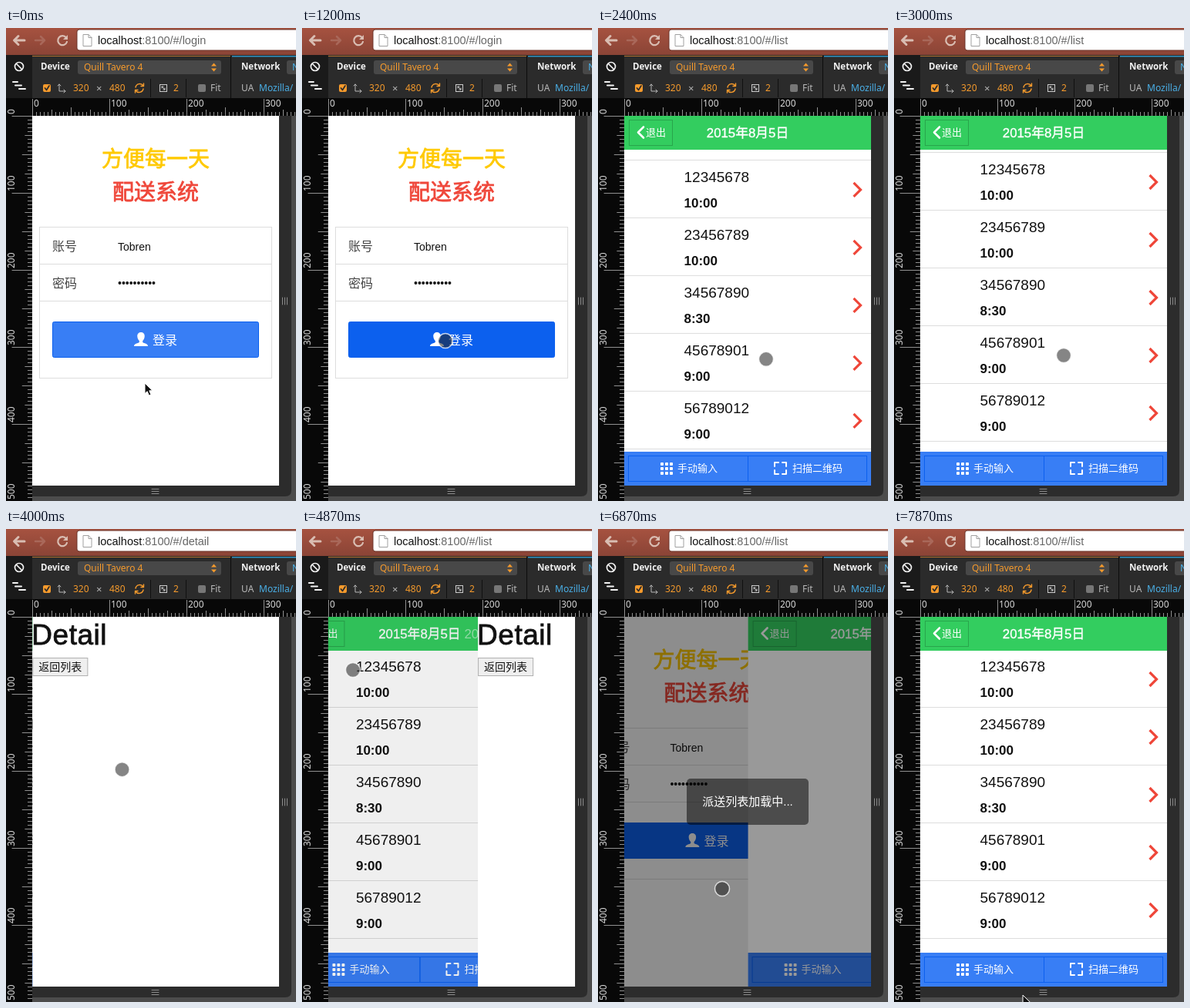
Write an HTML page that moves like this. It is 376 px wide and 614 px high and loops after 7940 ms.

```html
<!DOCTYPE html>
<html lang="zh-CN">
<head>
<meta charset="utf-8">
<title>Delivery app preview</title>
<style>
  html, body { margin: 0; width: 100%; height: 100%; overflow: hidden; background: #4c4c4c; }
  svg { display: block; width: 376px; height: 614px; }
  text { font-family: "Liberation Sans", "Noto Sans CJK SC", "Noto Sans CJK", sans-serif; white-space: pre; }
  .ui { font-family: "Noto Sans", "Open Sans", sans-serif; }
  .b { font-weight: 700; }
  .m { font-weight: 500; }
  .line { fill: none; stroke-linecap: round; stroke-linejoin: round; }
</style>
</head>
<body>
<svg id="stage" viewBox="0 0 376 614" xmlns="http://www.w3.org/2000/svg"></svg>
<script>
const LOOP = 7940, STEP = LOOP / 119;
const WHITE = '#fff', BLUE = '#387ef5', DEEP = '#0c60ee', GREEN = '#33cd5f', GOLD = '#ffc900', RED = '#ef473a';
const EDGE = '#ddd', INK = '#111', ORANGE = '#f59a2c', SKY = '#4ab0e8', PALE = '#f2f2f2', GREY = '#b8b8b8';

// Markup helpers; text is placed by its left edge (or anchor) and visual middle.
const rect = (x, y, w, h, fill, more = '') =>
  `<rect x="${x}" y="${y}" width="${w}" height="${h}" fill="${fill}" ${more}/>`;
const frame = (x, y, w, h, stroke, more = '') =>
  rect(x + .5, y + .5, w - 1, h - 1, 'none', `stroke="${stroke}" ${more}`);
const text = (x, y, size, fill, str, more = '') =>
  `<text x="${x}" y="${y + size * .36}" font-size="${size}" fill="${fill}" ${more}>${str}</text>`;
const line = (d, stroke, w = 1, more = '') =>
  `<path class="line" d="${d}" stroke="${stroke}" stroke-width="${w}" ${more}/>`;
const heavy = (color, w) => `stroke="${color}" stroke-width="${w}"`;
const mid = 'text-anchor="middle"';

function browserBar() {
  return rect(0, 0, 376, 35, 'url(#wood)') +
    line('M24 16H11M16 10.500L10.500 16L16 21.500', '#d9bdb2', 3) +
    line('M38 16H50M45 11L50 16L45 21', '#a9685a', 2.500) +
    line('M78 12.500A6 6 0 1 0 79 18', '#d9bdb2', 2.200) +
    '<path d="M80 9V15H74Z" fill="#d9bdb2"/>' +
    rect(92, 2, 290, 27, WHITE, 'rx="3" stroke="#6b3328"') +
    '<path d="M100 8.500H107L111 12.500V23.500H100Z" fill="#fff" stroke="#a0a0a0"/>' +
    line('M107 8.500V12.500H111', '#a0a0a0') +
    `<text x="119" y="21" font-size="14.500" fill="#666"><tspan fill="${INK}">localhost</tspan><tspan id="path"></tspan></text>`;
}

function toolPanel() {
  const ui = 'class="ui"', bold = 'class="ui b"';
  return rect(0, 35, 376, 79, '#2b2b2b') + rect(0, 35, 34, 79, '#1a1a1a') +
    rect(34, 36, 257, 1, '#b3722e') + rect(293, 36, 83, 1.500, '#2f93c4') +
    rect(291, 36, 1, 55, '#0c0c0c') +
    `<circle cx="17" cy="50" r="5.500" fill="none" ${heavy(PALE, 1.7)}/>` +
    line('M13.500 46.500L20.500 53.500', PALE, 1.700) +
    line('M9 70H15M12 74.500H20M17 79H25', PALE, 2) +
    text(45, 50, 11.500, PALE, 'Device', bold) +
    rect(93, 42, 186, 18, '#484848', 'rx="3"') +
    text(101, 50.500, 12, ORANGE, 'Quill Tavero 4', 'class="ui m"') +
    `<path d="M266 49.500L269.500 45.500L273 49.500ZM266 52.500L269.500 56.500L273 52.500Z" fill="${ORANGE}"/>` +
    text(305, 50, 11.500, PALE, 'Network', bold) +
    rect(364, 42, 20, 18, '#484848', 'rx="3"') + text(371, 50.500, 12, SKY, 'N', ui) +
    rect(48, 73, 10, 10, ORANGE, 'rx="2"') + line('M50.500 78L52.500 80.500L56 75', '#2b2b2b', 1.700) +
    line('M69 73V82H77M67 75L69 73L71 75M75 80L77 82L75 84', GREY) +
    text(87, 78, 12, ORANGE, '320', ui) + text(117, 78, 13, GREY, '×', ui) +
    text(134, 78, 12, ORANGE, '480', ui) +
    line('M168 77A5.500 5.500 0 0 1 178 75M178 79A5.500 5.500 0 0 1 168 81M178.500 72V75.500H175M167.500 84V80.500H171', ORANGE, 1.400) +
    rect(187, 66, 1, 24, '#111') + rect(233, 66, 1, 24, '#111') +
    frame(199, 73, 10, 10, '#ccc') + line('M202 76L206 80M202 78V76H204M206 78V80H204', '#ccc') +
    text(217, 78, 12, ORANGE, '2', ui) +
    rect(249, 73, 10, 10, '#777', 'rx="2"') + text(265, 78, 12, GREY, 'Fit', ui) +
    text(305, 78, 12, GREY, 'UA', ui) + text(328, 78, 12, SKY, 'Mozilla/', ui);
}

function rulers() {
  let ticks = '', labels = '';
  for (let p = 0; p <= 500; p += 5) {
    const len = p % 100 ? (p % 50 ? (p % 25 ? 5 : 8) : 11) : 22;
    if (p < 342) ticks += `M${34.5 + p} 114V${114 - len}`;
    ticks += `M34 ${114.5 + p}H${34 - len * 1.2}`;
    if (p % 100) continue;
    if (p <= 300) labels += text(36 + p, 98, 12, '#d8d8d8', p, 'class="ui"');
    labels += `<g transform="translate(7 ${112 + p}) rotate(-90)">${text(0, 0, 12, '#d8d8d8', p, 'class="ui"')}</g>`;
  }
  return rect(34, 91, 342, 23, '#080808') + rect(0, 91, 34, 523, '#080808') +
    `<path d="${ticks}" stroke="#909090" fill="none"/>` + labels;
}

function resizers() {
  return rect(34, 114, 342, 500, '#4c4c4c') +
    '<path d="M34 114H370V600Q370 608 362 608H34Z" fill="#2c2c2c"/>' +
    line('M358.500 350V359M361.500 350V359M364.500 350V359M189 598.500H198M189 601.500H198M189 604.500H198', '#8c8c8c');
}

function loginPage() {
  const person = 'M175 395C171.500 395 170 397.500 170.300 400.500C170.500 403 171.500 405 172.800 406V408C171 409.500 166 409.500 166 413H184C184 409.500 179 409.500 177.200 408V406C178.500 405 179.500 403 179.700 400.500C180 397.500 178.500 395 175 395Z';
  return rect(34, 114, 320, 480, WHITE) +
    text(194, 170, 28, GOLD, '方便每一天', `${heavy(GOLD, .8)} ${mid}`) +
    text(194, 213, 28, RED, '配送系统', `${heavy(RED, .8)} ${mid}`) +
    frame(43, 258, 302, 197, EDGE) + rect(43, 306, 302, 1, EDGE) + rect(43, 354, 302, 1, EDGE) +
    `<g id="bar">${rect(43, 259, 3, 95, '#42a948')}</g>` +
    `<g id="labels">${text(60, 283, 16, '#444', '账号')}${text(60, 331, 16, '#444', '密码')}</g>` +
    `<g id="inputs">${text(145, 284, 14, INK, 'Tobren')}${text(145, 331, 14, INK, '•'.repeat(10))}</g>` +
    rect(60.5, 381.5, 267, 46, BLUE, `id="login" rx="2" stroke="${DEEP}"`) +
    `<path d="${person}" fill="${WHITE}"/>` + text(190, 405, 16, WHITE, '登录');
}

function listPage() {
  const rows = [['12345678', '10:00'], ['23456789', '10:00'], ['34567890', '8:30'], ['45678901', '9:00'], ['56789012', '9:00']];
  const items = rows.map(([code, time], i) => {
    const y = 157 + i * 75;
    return text(111.5, y + 21, 19, INK, code) + text(111.5, y + 55, 17, INK, time, 'class="b"') +
      line(`M331.500 ${y + 29}L340.500 ${y + 38}L331.500 ${y + 47}`, RED, 3.2, 'style="stroke-linecap:butt;stroke-linejoin:miter"') +
      rect(34, y + 74, 320, 1, EDGE);
  }).join('');
  let dots = '';
  for (let i = 0; i < 9; i++) dots += rect(81 + i % 3 * 6, 564 + (i / 3 | 0) * 6, 4, 4, WHITE, 'rx="1"');
  const date = '2015年8月5日';
  return rect(34, 114, 320, 480, WHITE) +
    `<g id="rows">${rect(34, 156, 320, 1, EDGE)}${items}</g>` +
    rect(34, 114, 320, 44, GREEN) + frame(40, 119, 57, 34, '#28a54c') +
    line('M59 128.500L52 135.500L59 142.500', WHITE, 2.600) + text(62, 135.500, 13, WHITE, '退出') +
    text(194, 136, 16.800, WHITE, date, `${heavy(WHITE, .35)} ${mid}`) +
    `<g id="ghost">${text(252, 136, 16.800, WHITE, date, 'opacity=".5"')}</g>` +
    rect(34, 550, 320, 44, BLUE) + frame(39, 555, 156, 34, DEEP) + frame(194, 555, 155, 34, DEEP) +
    dots + text(103, 571.500, 13, WHITE, '手动输入') +
    line('M229 569V564H234M239 564H244V569M244 574V579H239M234 579H229V574', WHITE, 2) +
    text(252, 571.500, 13, WHITE, '扫描二维码');
}

function detailPage() {
  return rect(34, 114, 320, 480, WHITE) +
    text(33, 137, 37, INK, 'Detail', `${heavy(INK, .8)} letter-spacing=".5"`) +
    rect(34.5, 167.5, 71, 23, '#efefef', 'stroke="#b0b0b0"') + text(42, 179, 14, INK, '返回列表');
}

const page = (i, body) =>
  `<g id="page${i}">${body}${rect(34, 114, 320, 480, '#000', `id="dim${i}"`)}</g>`;
const $ = id => document.getElementById(id);

$('stage').innerHTML =
  '<defs><linearGradient id="wood" x2="0" y2="1"><stop stop-color="#a65240"/><stop offset="1" stop-color="#8a4436"/></linearGradient>' +
  `<clipPath id="glass">${rect(34, 114, 320, 480, '#000')}</clipPath></defs>` +
  browserBar() + toolPanel() + resizers() + rulers() +
  `<g clip-path="url(#glass)">${page(0, loginPage())}${page(1, listPage())}${page(2, detailPage())}` +
  rect(34, 114, 320, 480, '#000', 'id="shade"') +
  `<g id="loading">${rect(115, 324, 158, 60, '#000', 'rx="5" opacity=".5"')}${text(194, 354, 15, WHITE, '派送列表加载中...', mid)}</g></g>` +
  '<circle id="touch" r="9.500" fill="#202020" fill-opacity=".55" stroke="#fff" stroke-opacity=".75" stroke-width="1.500"/>' +
  '<path id="arrow" d="M0 0V13.500L3.200 10.700L5.400 16L8 15L5.800 9.800H10Z" fill="#111" stroke="#fff"/>';

const clamp = v => Math.max(0, Math.min(1, v));
const smooth = v => v * v * (3 - 2 * v);

// cubic-bezier(.36, .66, .04, 1)
function slide(x) {
  if (x <= 0 || x >= 1) return clamp(x);
  const curve = (s, a, b) => 3 * (1 - s) ** 2 * s * a + 3 * (1 - s) * s * s * b + s ** 3;
  let lo = 0, hi = 1;
  for (let i = 0; i < 24; i++) {
    const s = (lo + hi) / 2;
    if (curve(s, .36, .04) < x) lo = s; else hi = s;
  }
  return curve(lo, .66, 1);
}

// Value of a track of [time, ...values] points.
function track(points, t) {
  const i = points.findIndex(p => p[0] > t);
  if (i < 0) return points[points.length - 1].slice(1);
  if (!i) return points[0].slice(1);
  const a = points[i - 1], b = points[i], k = smooth((t - a[0]) / (b[0] - a[0]));
  return a.slice(1).map((v, j) => v + (b[j + 1] - v) * k);
}

// [start, depth change]: login is 0, list 1, detail 2
const moves = [[1300, 1], [3550, 1], [4760, -1], [5480, -1], [6777, 1]];
const paths = [':8100/#/login', ':8100/#/list', ':8100/#/detail'];
const loads = [[1230, 1670], [6690, 7140]];
const pointer = [[0, 180, 461], [800, 185, 407], [1300, 186, 406], [1730, 190, 409], [2100, 212, 400],
  [2550, 220, 440], [3000, 220, 425], [3450, 212, 405], [3650, 210, 403], [4450, 66, 183], [4870, 66, 183],
  [5300, 67, 138], [5600, 68, 138], [6070, 85, 178], [6500, 160, 408], [6700, 160, 415], [6870, 161, 467],
  [7350, 164, 585], [7870, 167, 605]];
const pull = [[2100, 0], [2550, 20], [2700, 20], [3000, 5], [3130, 0]];

const show = (id, on) => { $(id).style.display = on ? '' : 'none'; };
const shift = (id, x, y = 0) => $(id).setAttribute('transform', `translate(${x} ${y})`);

function render(t) {
  let depth = 0, target = 0;
  for (const [start, change] of moves) {
    depth += change * slide((t - start) / 500);
    if (t >= start) target += change;
  }
  $('path').textContent = paths[target];
  for (let i = 0; i < 3; i++) {
    const behind = clamp(depth - i);
    shift('page' + i, i > depth ? 320 * (i - depth) : -105.6 * behind);
    show('page' + i, i - depth < 1 && behind < 1);
    $('dim' + i).setAttribute('opacity', .16 * behind);
  }
  show('ghost', depth > 1 && depth < 2);

  const valid = t > 1800;
  show('bar', valid);
  shift('labels', valid ? 2 : 0);
  shift('inputs', valid ? 1 : 0);
  $('login').setAttribute('fill', loads.some(([a, b]) => t > a - 70 && t < b + 130) ? DEEP : BLUE);

  shift('rows', 0, track(pull, t)[0]);
  show('rows', t >= loads[0][1] && (t < 6200 || t >= loads[1][1]));

  const veil = Math.max(...loads.map(([a, b]) => Math.min(clamp((t - a) / 100), clamp(1 - (t - b) / 130))));
  $('shade').setAttribute('opacity', .4 * veil);
  $('loading').setAttribute('opacity', Math.sqrt(veil));

  const [x, y] = track(pointer, t), outside = t < 60 || y > 594;
  show('arrow', outside);
  show('touch', !outside);
  shift('arrow', x, y);
  shift('touch', x, y);
}

const begin = performance.now();
function tick() {
  const t = (performance.now() - begin) % LOOP;
  render(Math.floor((t + 5) / STEP) % 119 * STEP);
  requestAnimationFrame(tick);
}
tick();
</script>
</body>
</html>
```
